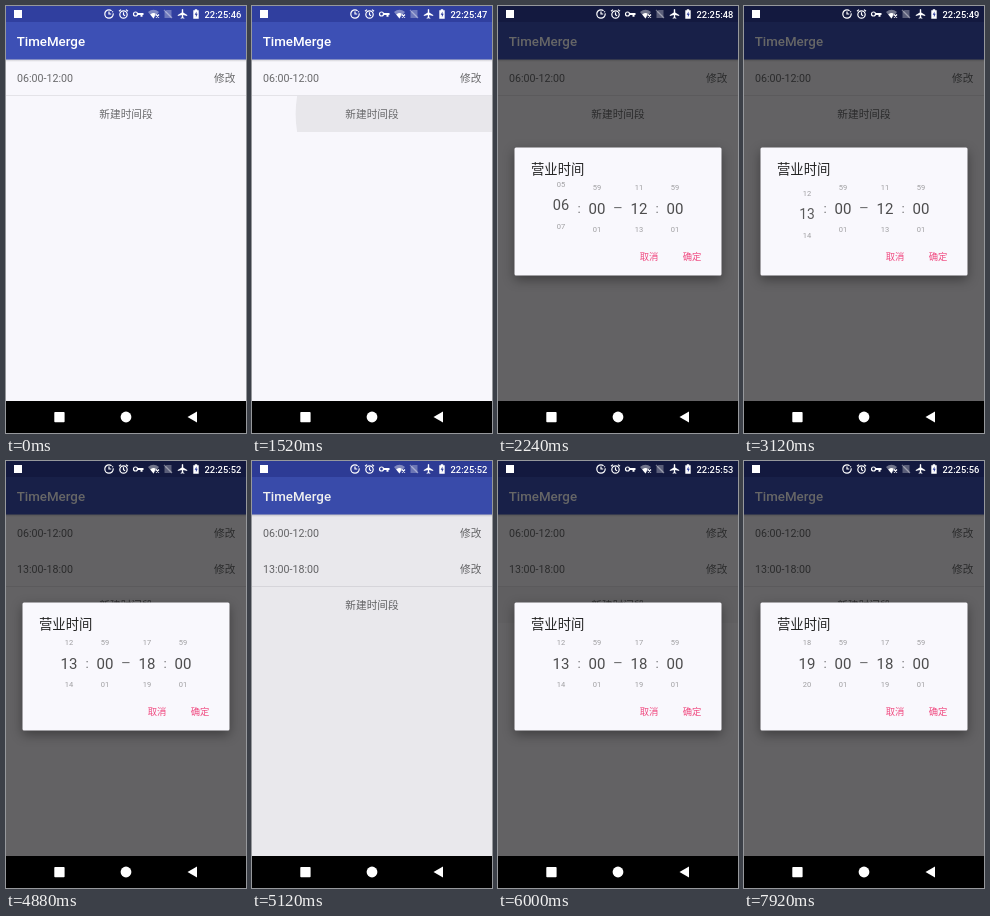
These frames come from a looping animation (240x427 px, 8 s). An HTML page:

```html
<!DOCTYPE html>
<html lang="zh-CN">
<head>
<meta charset="utf-8">
<title>TimeMerge</title>
<style>
  html, body { margin: 0; width: 100%; height: 100%; overflow: hidden; background: #000; }
  svg { display: block; width: 240px; height: 427px; }
  text { font-family: Roboto, "Noto Sans CJK SC", "Noto Sans CJK", sans-serif; white-space: pre; }
  .row { font-size: 10.67px; fill: #69696b; }
  .end { text-anchor: end; }
  .mid { text-anchor: middle; }
  .bold { font-weight: 500; fill: #fff; }
  .action { font-size: 9.33px; fill: #f0487f; }
  .line { fill: none; stroke: #fff; stroke-width: 1.2; }
  #dialog { transform-origin: 120px 205px; }
  #panel { filter: drop-shadow(0 4px 6px rgba(0, 0, 0, .38)); }
</style>
</head>
<body>
<svg viewBox="0 0 240 427">
  <defs>
    <linearGradient id="shade" x2="0" y2="1">
      <stop stop-opacity=".2"/><stop offset="1" stop-opacity="0"/>
    </linearGradient>
    <clipPath id="window"><rect x="40" y="172" width="160" height="61"/></clipPath>
    <clipPath id="cell"><rect y="90" width="240" height="36"/></clipPath>
  </defs>

  <rect width="240" height="395" fill="#f8f7fc"/>
  <rect y="53" width="240" height="3" fill="url(#shade)"/>
  <rect width="240" height="53.5" fill="#3d50b5"/>
  <rect width="240" height="16" fill="#303f9f"/>
  <text class="bold" x="10.7" y="40.2" font-size="13.33">TimeMerge</text>

  <text class="row" x="11" y="76">06:00-12:00</text>
  <text class="row end" x="229.3" y="76">修改</text>
  <g id="added">
    <text class="row" x="11" y="111.6">13:00-18:00</text>
    <text class="row end" x="229.3" y="111.6">修改</text>
  </g>
  <g id="create">
    <g clip-path="url(#cell)"><circle id="ripple" cx="150" cy="108"/></g>
    <rect y="89" width="240" height="1" fill="#e4e3e8"/>
    <text class="row mid" x="120" y="112">新建时间段</text>
  </g>

  <rect id="dim" width="240" height="395"/>

  <g fill="#fff">
    <rect x="8" y="4" width="8" height="8"/>
    <circle class="line" cx="103" cy="8" r="4.2" stroke-dasharray="22 1 1 1"/>
    <path class="line" d="M103 5.5v2.5h2.2"/>
    <circle class="line" cx="117.5" cy="8.5" r="3.7"/>
    <path class="line" d="M117.5 6.3v2.4l1.6 1M113 5.3l2-1.7M122 5.3l-2-1.7"/>
    <circle class="line" cx="129.5" cy="8" r="2" stroke-width="1.7"/>
    <path d="M131.5 7h6v2h-1v1.8h-2V9h-3z"/>
    <path d="M142 6q5.5-4.5 11 0l-5.5 6.5z" opacity=".4"/>
    <path d="M144.2 8.5q3.3-2.5 5.5-.8l-2.2 4.8z"/>
    <path class="line" d="M150 8.5l3 3M153 8.5l-3 3"/>
    <path d="M160.5 4h5v8h-7V6z" opacity=".3"/>
    <path class="line" d="M158 4l8 8" opacity=".4"/>
    <path d="M175.8 3.5q.7-1 1.4 0v3l4 2.5v1.1l-4-1.2v2.3l1.1.8v.8l-1.8-.5-1.8.5v-.8l1.1-.8V8.9l-4 1.2V9l4-2.500z"/>
    <path d="M188.8 3.2h2.4v1h1.500v8.600h-5.400V4.200h1.500z"/>
    <path d="M190.500 5.500l-1.800 3.300h1.200v2.500l1.800-3.500h-1.200z" fill="#303f9f"/>
    <text id="clock" class="bold end" x="235.3" y="11.7" font-size="9.33"></text>
  </g>

  <g id="dialog">
    <rect id="panel" x="16.5" y="141.500" width="207" height="128" rx="1.5" fill="#f9f8fd"/>
    <text x="33" y="167.500" font-size="13.33" fill="#222">营业时间</text>
    <g id="wheels" clip-path="url(#window)" class="mid" fill="#333"></g>
    <g class="mid" font-size="13.33" fill="#707072">
      <text x="81" y="206.5">:</text>
      <text x="120" y="207" font-size="15">–</text>
      <text x="159" y="206.5">:</text>
    </g>
    <text class="action mid" x="151" y="254.3">取消</text>
    <text class="action mid" x="194" y="254.3">确定</text>
  </g>

  <rect y="395" width="240" height="32"/>
  <g fill="#fff">
    <rect x="48.3" y="406" width="10.300" height="10.300" rx=".8"/>
    <circle cx="120" cy="411" r="5.4"/>
    <path d="M181.5 411l9.5-5.5v11z"/>
  </g>
</svg>

<script>
const LOOP = 8000, STEP = 80;
const GAP = 21, MIN = 7.5, MAX = 15, CENTRE = 202.5;
const TAP_1 = 1360, ADD = 4880, CLOSE = 4960, TAP_2 = 5520;
const $ = id => document.getElementById(id);
const pad = n => String(n).padStart(2, '0');

// Smooth 0 to 1 over a span of time
function ramp(t, start, length) {
  const p = Math.min(1, Math.max(0, (t - start) / length));
  return p * p * (3 - 2 * p);
}

// A swipe stops a little short, then the wheel snaps to the next number
function swipe(t, start, steps) {
  const rest = 6 / GAP;
  return (steps - rest) * ramp(t, start, 840) + rest * ramp(t, start + 960, 120);
}

// How far the dialog is open: two openings with one closing between them
function openness(t, inTime, outTime) {
  return ramp(t, TAP_1 + 240, inTime) - ramp(t, CLOSE, outTime) + ramp(t, TAP_2 + 240, inTime);
}

function makeWheel(x, count) {
  const items = [-2, -1, 0, 1, 2].map(k => {
    const el = document.createElementNS('http://www.w3.org/2000/svg', 'text');
    el.setAttribute('x', x);
    $('wheels').append(el);
    return { k, el };
  });
  return value => {
    const near = Math.round(value);
    for (const { k, el } of items) {
      const d = (near + k - value) * GAP;
      const grow = Math.max(0, 1 - (d / MAX) ** 2);
      const size = MIN + (MAX - MIN) * grow;
      el.textContent = pad((near + k + count) % count);
      el.setAttribute('font-size', size);
      el.setAttribute('y', CENTRE + d + size * .355);
      el.setAttribute('fill-opacity', .45 + .42 * grow);
    }
  };
}

const fromHour = makeWheel(63, 24), toHour = makeWheel(141, 24);
for (const x of [99, 177]) makeWheel(x, 60)(0);

function draw(t) {
  $('clock').textContent = '22:25:' + (46 + Math.floor((t + 74) / 799));

  const added = t >= ADD;
  $('added').setAttribute('visibility', added ? 'visible' : 'hidden');
  $('create').setAttribute('transform', `translate(0 ${added ? 36 : 0})`);

  const age = t + STEP - (added ? TAP_2 : TAP_1);
  const live = age > 0 && age < 880;
  $('ripple').setAttribute('r', live ? 20 + age * .36 : 0);
  $('ripple').setAttribute('fill-opacity', live ? .09 * (1 - age / 880) : 0);

  const alpha = openness(t, 150, 160);
  $('dim').setAttribute('fill-opacity', .6 * openness(t, 240, 200));
  $('dialog').style.opacity = alpha;
  $('dialog').style.transform = `scale(${.95 + .05 * alpha})`;

  fromHour(6 + swipe(t, 2160, 7) + swipe(t, 6640, 6));
  toHour(12 + swipe(t, 3440, 6));
}

const start = performance.now();
function frame() {
  const t = (performance.now() - start) % LOOP;
  draw(Math.floor(t / STEP) * STEP);
  requestAnimationFrame(frame);
}
frame();
</script>
</body>
</html>
```
